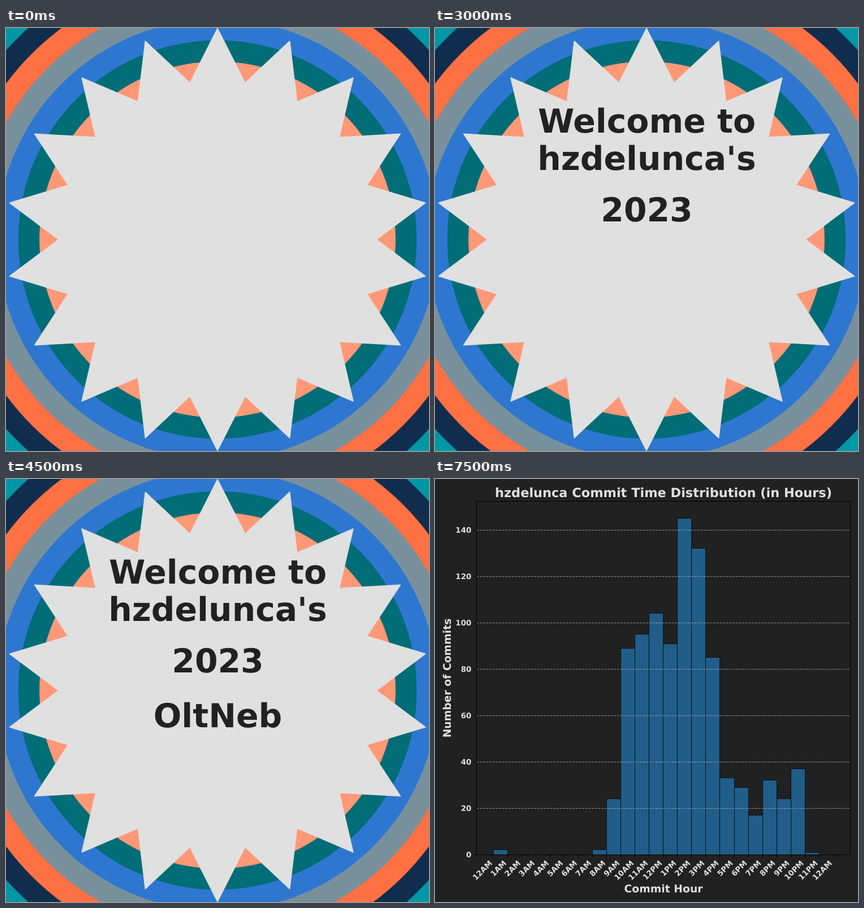
Recreate the animation shown at these times as an HTML page. Size 748x748 px, loop 8000 ms.

```html
<!DOCTYPE html>
<html lang="en">
<head>
<meta charset="utf-8">
<title>Year in Review</title>
<style>
  html, body { margin: 0; width: 100%; height: 100%; overflow: hidden; background: #212121; }
  svg { display: block; width: 100vw; height: 100vh; }
  text { font-family: "DejaVu Sans", sans-serif; font-weight: bold; text-rendering: geometricPrecision; }
  #intro text { font-size: 58.33px; fill: #212121; text-anchor: middle; }
  #chart text { fill: #e0e0e0; }
</style>
</head>
<body>
<svg viewBox="0 0 748 748">
  <g id="intro"></g>
  <g id="chart"></g>
</svg>
<script>
const SIZE = 748, MID = SIZE / 2, LOOP = 8000, STEP = 1500;
const USER = "hzdelunca";
const intro = document.getElementById("intro");
const chart = document.getElementById("chart");

function add(parent, tag, attrs, content = "") {
  const node = document.createElementNS("http://www.w3.org/2000/svg", tag);
  for (const name in attrs) node.setAttribute(name, attrs[name]);
  node.textContent = content;
  parent.append(node);
  return node;
}

// Centre of the pixel that holds v, for crisp lines
const snap = v => Math.floor(v) + 0.5;

// Intro: concentric rings, starburst and captions
function buildIntro() {
  const outlined = color => ({ fill: color, stroke: color, "stroke-width": 1.4, "stroke-linejoin": "round" });

  add(intro, "rect", { width: SIZE, height: SIZE, fill: "#0097a7" });
  ["#112d4e", "#ff7043", "#78909c", "#2e77d0", "#006d77", "#ff9877"].forEach((color, i) =>
    add(intro, "circle", { cx: MID, cy: MID, r: SIZE * (0.67 - 0.05 * i), ...outlined(color) }));

  const points = Array.from({ length: 36 }, (_, i) => {
    const angle = i * Math.PI / 18, r = i % 2 ? 281.2 : 373.4;
    return [MID + r * Math.sin(angle), MID - r * Math.cos(angle)];
  });
  add(intro, "polygon", { points: points.join(" "), ...outlined("#e0e0e0") });

  const captions = [
    [["Welcome to", 185], [USER + "'s", 251]],
    [["2023", 342]],
    [["OltNeb", 438.5]],
    [["Year in Review!", 543.5]]
  ];
  return captions.map(lines => {
    const group = add(intro, "g", {});
    lines.forEach(([text, y]) => add(group, "text", { x: MID + 0.5, y }, text));
    return group;
  });
}

// Chart: commits per hour
function buildChart() {
  const left = 73.5, right = 734.5, top = 39.5, base = 664.5;
  const hourX = h => 103.5 + 25.03 * h;
  const countY = n => 664.1 - 4.1 * n;
  const counts = [2, 0, 0, 0, 0, 0, 0, 2, 24, 89, 95, 104, 91, 145, 132, 85, 33, 29, 17, 32, 24, 37, 1, 0];

  const label = (text, x, y, size, anchor, turn = 0) => add(chart, "text", {
    transform: `translate(${x} ${y}) rotate(${turn})`, "font-size": size, "text-anchor": anchor
  }, text);
  const line = (x1, y1, x2, y2, style) => add(chart, "line", { x1, y1, x2, y2, ...style });
  const black = { stroke: "#000", "stroke-width": 1 };
  const dashed = { stroke: "#b0b0b0", "stroke-opacity": 0.75, "stroke-width": 1, "stroke-dasharray": "3.95 1.7" };

  add(chart, "rect", { width: SIZE, height: SIZE, fill: "#212121" });

  counts.forEach((n, h) => {
    if (!n) return;
    const x = snap(hourX(h)), y = snap(countY(n));
    add(chart, "rect", {
      x, y, width: snap(hourX(h + 1)) - x, height: base - y,
      fill: "#205d88", ...black, "stroke-opacity": 0.7
    });
  });

  for (let n = 0; n <= 140; n += 20) {
    const y = snap(countY(n));
    if (n) line(left, y, right, y, dashed);
    line(left - 4.7, y, left, y, black);
    label(n, 64.3, y + 4.9, 13.4, "end");
  }

  for (let h = 0; h <= 24; h++) {
    const x = snap(hourX(h));
    line(x, base, x, base + 4.7, black);
    label((h % 12 || 12) + (h % 24 < 12 ? "AM" : "PM"), hourX(h) - 1.4, 680.3, 13.4, "end", -45);
  }

  add(chart, "rect", { x: left, y: top, width: right - left, height: base - top, fill: "none", ...black });
  const centerX = (left + right) / 2;
  label(USER + " Commit Time Distribution (in Hours)", centerX, 32, 22.45, "middle");
  label("Commit Hour", centerX, 730.5, 18.8, "middle");
  label("Number of Commits", 28, (top + base) / 2, 18.8, "middle", -90);
}

const captionGroups = buildIntro();
buildChart();

const show = (node, visible) => node.setAttribute("visibility", visible ? "visible" : "hidden");

function draw() {
  const stage = Math.floor(performance.now() % LOOP / STEP);
  const charting = stage > captionGroups.length;
  show(intro, !charting);
  show(chart, charting);
  captionGroups.forEach((group, i) => show(group, !charting && stage > i));
  requestAnimationFrame(draw);
}
draw();
</script>
</body>
</html>
```
